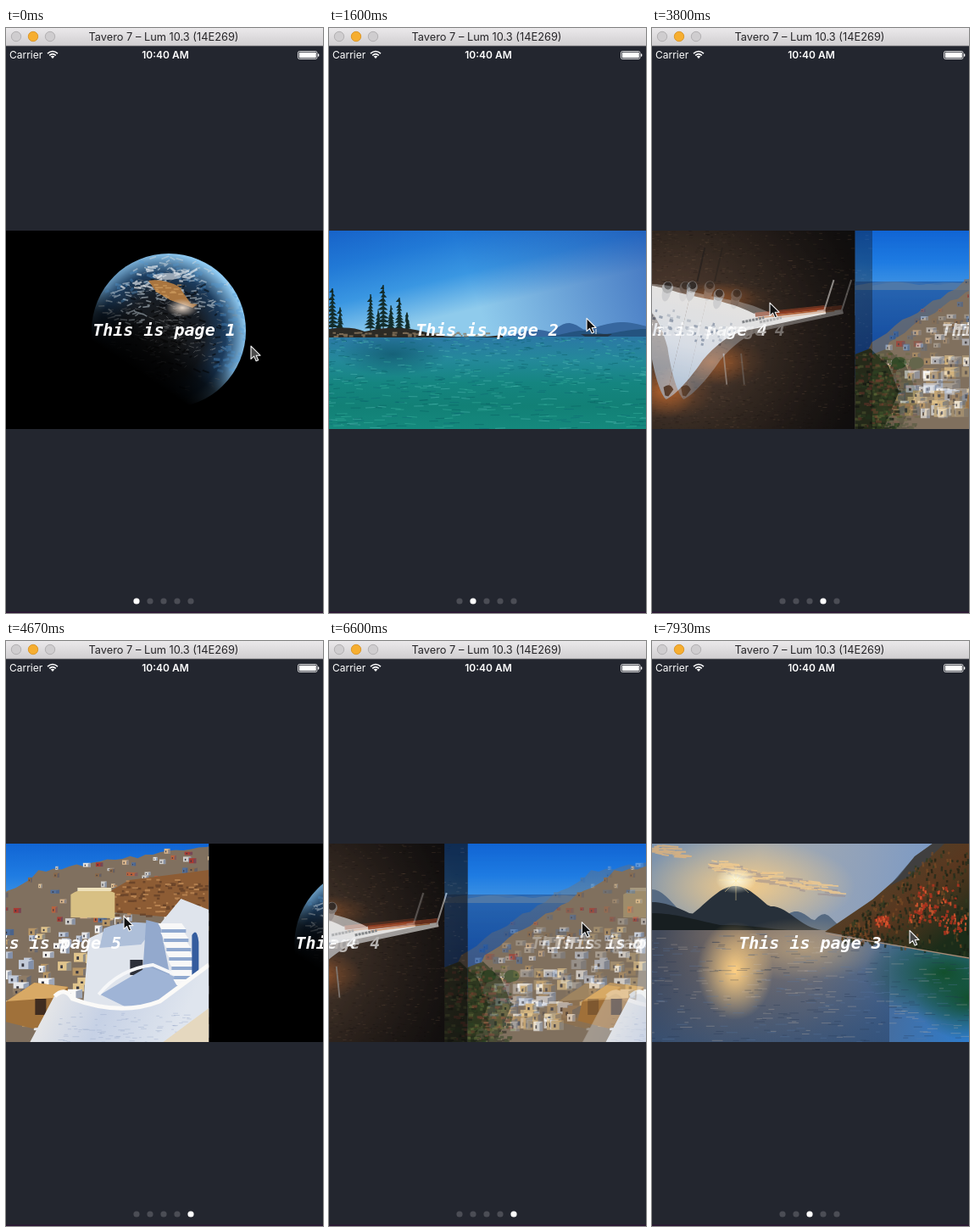
Animation of 374 by 690 pixels, one loop 8000 ms. Source, as an HTML page:

```html
<!DOCTYPE html>
<html lang="en">
<head>
<meta charset="utf-8">
<title>Looping pager</title>
<style>
  html, body { margin: 0; width: 100%; height: 100%; overflow: hidden; background: #23262f; }
  svg { display: block; }
  .ui { font-family: Inter, Roboto, sans-serif; }
  .label { font: italic bold 20px "DejaVu Sans Mono", monospace; fill: #fff; }
</style>
</head>
<body>
<svg id="stage" width="374" height="690" viewBox="0 0 374 690"></svg>
<script>
const W = 374, H = 234, TOP = 239, LOOP = 8000, STEP = 200 / 3;
const stage = document.getElementById('stage');

// --- drawing helpers ---
let seed = 7;
const rnd = (a = 0, b = 1) => {
  seed = (seed * 16807) % 2147483647;
  return a + (b - a) * seed / 2147483647;
};
const pick = list => list[Math.floor(rnd(0, list.length))];
const many = (n, make) => Array.from({ length: n }, (_, i) => make(i)).join('');
const px = v => v.toFixed(1);
const rect = (x, y, w, h, fill, extra = '') =>
  `<rect x="${px(x)}" y="${px(y)}" width="${px(w)}" height="${px(h)}" fill="${fill}" ${extra}/>`;
const oval = (x, y, rx, ry, fill, extra = '') =>
  `<ellipse cx="${px(x)}" cy="${px(y)}" rx="${px(rx)}" ry="${px(ry)}" fill="${fill}" ${extra}/>`;
const path = (d, fill, extra = '') => `<path d="${d}" fill="${fill}" ${extra}/>`;
const line = (d, color, width, extra = '') =>
  path(d, 'none', `stroke="${color}" stroke-width="${width}" ${extra}`);
const stops = colors => colors.map((c, i) => `<stop offset="${i / (colors.length - 1)}" stop-color="${c}"/>`).join('');
const linear = (id, x1, y1, x2, y2, ...colors) =>
  `<linearGradient id="${id}" gradientUnits="userSpaceOnUse" x1="${x1}" y1="${y1}" x2="${x2}" y2="${y2}">${stops(colors)}</linearGradient>`;
const radial = (id, cx, cy, r, ...colors) =>
  `<radialGradient id="${id}" gradientUnits="userSpaceOnUse" cx="${cx}" cy="${cy}" r="${r}">${stops(colors)}</radialGradient>`;
const glow = (id, color) => `<radialGradient id="${id}">${stops([color, color + '00'])}</radialGradient>`;

// Scattered short strokes; place() gives x, y, dx, dy.
const dashes = (n, color, width, alpha, place) => line(many(n, () => {
  const [x, y, dx, dy = 0] = place();
  return `M${px(x)} ${px(y)}l${px(dx)} ${px(dy)}`;
}), color, width, `opacity="${alpha}"`);
const within = (x0, x1, y0, y1, len) => () => [rnd(x0, x1), rnd(y0, y1), rnd(len * .3, len)];

// A mountain outline made of bell-shaped peaks: centre, height, width.
const mountains = (base, fill, ...peaks) => {
  let d = `M0 ${base}`;
  for (let x = 0; x <= W + 4; x += 4) {
    const height = Math.max(...peaks.map(([c, h, w]) => h * Math.exp(-(((x - c) / w) ** 2))));
    d += `L${x} ${px(base - height)}`;
  }
  return path(`${d}V${base}z`, fill);
};

// --- the five pictures ---
function earth() {
  const around = (from, to, near, far, len) => () => {
    const a = rnd(from, to), d = rnd(near, far);
    return [192 + Math.cos(a) * d, 118 + Math.sin(a) * d, rnd(len * .3, len), rnd(-len, len) * .4];
  };
  return radial('globe', 184, 126, 100, '#1a1b1d', '#17191c', '#171d25', '#1c3c5e', '#8fcaf2')
    + linear('night', 147, 160, 182, 108, '#000', '#000b', '#0000')
    + glow('landGlow', '#e9d8c8')
    + '<clipPath id="disc"><circle cx="192" cy="118" r="91"/></clipPath>'
    + rect(0, 0, W, H, '#000')
    + `<g clip-path="url(#disc)">${rect(90, 20, 200, 200, 'url(#globe)')}`
    + dashes(90, '#4f96d2', 3, .35, around(-2.6, .7, 62, 90, 9))
    + dashes(260, '#8d8f92', 1, .42, around(0, 6.3, 5, 85, 7))
    + dashes(120, '#000', 2, .5, around(0, 6.3, 0, 70, 8))
    + dashes(120, '#c9d5df', 1.6, .55, around(-3, -.5, 35, 88, 9))
    + dashes(30, '#fff', 2.4, .6, around(-2.4, -1.2, 50, 80, 11))
    + path('M168 59 Q185 56 204 66 L218 86 226 87 220 91 194 82 177 72z', '#a9753f')
    + dashes(16, '#d2a062', 1.5, .7, within(174, 205, 63, 79, 8))
    + oval(190, 54, 17, 4, '#fff', 'opacity=".55"') + oval(208, 91, 19, 11, 'url(#landGlow)')
    + '</g>' + rect(90, 20, 200, 200, 'url(#night)');
}

function lake() {
  const pine = (x, height) => line(`M${x} 118v${-height}`, '#152723', 1.2) + many(10, i => {
    const y = 118 - height * (1 - i / 11), reach = (i + 1.5) * height / 75;
    return path(`M${x} ${px(y)}l${px(reach + rnd(0, 2))} 5h${px(-2 * reach - rnd(0, 4))}z`, '#142d2b');
  });
  return linear('sky2', 0, 0, 30, 126, '#1763c9', '#2179d6', '#3a97e2', '#8fcbec')
    + linear('dusk2', 170, 70, 374, 0, '#123fa500', '#123fa599')
    + linear('water2', 0, 125, 0, H, '#2b78a5', '#24899a', '#158580', '#128076', '#15897d')
    + glow('shade2', '#0b4a60')
    + rect(0, 0, W, 126, 'url(#sky2)') + rect(0, 0, W, 126, 'url(#dusk2)')
    + mountains(126, '#37679f', [245, 9, 28], [283, 17, 22], [346, 18, 50])
    + mountains(126, '#24537f', [300, 8, 30], [374, 10, 50])
    + rect(0, 125, W, 110, 'url(#water2)')
    + oval(75, 146, 65, 26, 'url(#shade2)', 'opacity=".6"')
    + many(4, i => dashes(150, ['#075a5e', '#3fb9a4', '#0c6374', '#5cc2bd'][i], 1, .42, () => {
      const depth = rnd() ** 1.4;
      return [rnd(-10, W), 127 + depth * 107, rnd(3, 6) + depth * 8, rnd(-1, 1)];
    }))
    + [[4, 50], [49, 43], [64, 54], [83, 39]].map(([x, h]) => pine(x, h) + pine(x + 9, h * .55)).join('')
    + path('M0 116 Q25 112 42 119 Q80 110 115 120 T205 123 V126 H0z', '#2c2a25')
    + dashes(45, '#8b7860', 2, .8, within(0, 195, 120, 125, 6))
    + path('M297 122H334l-5 3H302z', '#243749') + line('M315 122v-6', '#dce9f1', 1);
}

function sunset() {
  const slope = () => {
    const x = rnd(225, W), top = Math.max(3, 92 - (x - 230) * .9);
    return [x, rnd(top + 5, 114 + (x - 222) * .1), rnd(-1, 1), rnd(2, 6)];
  };
  const grove = (cx, cy, r) => () => [cx + rnd(-r, r), cy + rnd(-r, r) * .7, rnd(-1, 1), rnd(2, 5)];
  const streaks = (x, y, w, tilt) => () => {
    const k = rnd();
    return [x + k * w, y + k * tilt + rnd(-6, 6), rnd(5, 20), rnd(0, 2)];
  };
  return linear('sky3', 0, 0, W, 60, '#7c93ad', '#a7abad', '#8fa1bb', '#6f95cb')
    + linear('water3', 0, 130, W, 220, '#41495a', '#857468', '#7e7a7d', '#456d9f', '#2f7ccb')
    + linear('deep3', 0, 110, 0, H, '#30416300', '#304d74cc')
    + linear('hill3', 250, 30, 330, 130, '#4f432b', '#59371f', '#1b2c19')
    + glow('gold', '#ffd083') + glow('sunCore', '#fffde2') + glow('green3', '#124f2c')
    + rect(0, 0, W, 104, 'url(#sky3)') + oval(110, 50, 130, 55, 'url(#gold)', 'opacity=".85"')
    + dashes(22, '#e2b57c', 2, .8, streaks(-10, 4, 40, 6))
    + dashes(60, '#9a8a8c', 2, .5, streaks(65, 26, 150, 32))
    + dashes(60, '#f3cb8e', 1.6, .8, streaks(65, 24, 150, 32))
    + mountains(102, '#566a82', [0, 48, 38], [170, 22, 25], [203, 19, 16])
    + mountains(104, '#27303a', [0, 35, 65], [98, 54, 52], [142, 30, 35])
    + mountains(104, '#171e20', [0, 22, 80], [90, 8, 60])
    + oval(99, 43, 24, 16, 'url(#sunCore)')
    + line('M99 26v41M79 43h40M85 31l29 27M112 31l-26 26', '#ffe6a0', .8, 'opacity=".6"')
    + rect(0, 102, W, 134, 'url(#water3)') + rect(0, 102, 280, 134, 'url(#deep3)')
    + oval(98, 150, 45, 58, 'url(#gold)') + oval(180, 125, 95, 38, 'url(#gold)', 'opacity=".4"')
    + oval(345, 152, 95, 58, 'url(#green3)') + oval(374, 182, 65, 50, 'url(#green3)')
    + many(3, i => dashes(150, ['#22334f', '#c0b4a8', '#587aa5'][i], 1, .32, within(-10, W, 106, H, 15)))
    + path('M204 104 L260 66 290 40 310 15 331 0H374V136L270 116z', 'url(#hill3)')
    + path('M280 50 L310 15 331 0h14L305 38z', '#38404a', 'opacity=".7"')
    + many(4, i => dashes(110, ['#1c2a1b', '#2f3b20', '#7b4a24', '#1a2013'][i], 2.4, .7, slope))
    + [[272, 90, 8], [320, 80, 16], [355, 92, 16], [338, 62, 24]].map(spot =>
      dashes(22, '#b8341f', 3, .8, grove(...spot)) + dashes(14, '#df5a30', 2, .8, grove(...spot))).join('')
    + line('M205 106 Q265 116 374 135', '#a58c78', 1.4);
}

function aircraft() {
  const half = path('M0 4 C10 -2 24 -30 32 -51 C42 -70 55 -88 73 -96 L161 -137 157 -146 78 -118 C60 -122 46 -124 15 -122 H0z', 'url(#hull)')
    + line('M80 -117L158 -144', '#8d3c22', 5) + line('M84 -114L150 -138', '#c7733d', 1.5)
    + line('M158 -139l3 -39', '#c9c5c1', 2) + line('M54 -64l12 35', '#a19a95', 1.8)
    + dashes(11, '#5b6b85', 3, .8, within(8, 38, -100, -62, 5))
    + line('M67 -105l24 -11', '#4f5358', 3, 'stroke-dasharray="3 1"');
  const engine = (x, y) => oval(x, y + 6, 5, 11, '#c4c4c6') + oval(x, y, 6.5, 7, '#98989a') + oval(x, y - 2, 4.5, 4.5, '#2a2828');
  return radial('ground', 150, 125, 235, '#604431', '#4a382d', '#332821', '#1f1916', '#100e0e')
    + linear('hull', 0, -130, 0, 5, '#e6e3df', '#d8dde5', '#a9bdd3')
    + glow('fire', '#d8712c')
    + rect(0, 0, W, H, 'url(#ground)')
    + many(3, i => dashes(500, ['#0c0908', '#80624b', '#1a1411'][i], 1, .33, within(0, W, 0, H, 5)))
    + oval(205, 155, 45, 28, 'url(#fire)', 'opacity=".6"') + oval(145, 190, 42, 32, 'url(#fire)', 'opacity=".8"')
    + oval(205, 80, 55, 20, 'url(#fire)', 'opacity=".5"')
    + line('M197 20l-9 40', '#221e1c', 2)
    + `<g transform="translate(152 195) rotate(13.1)">${half}<g transform="scale(-1 1)">${half}</g>`
    + engine(-28, -125) + engine(0, -132) + engine(33, -130)
    + path('M-6 -9 Q0 -17 6 -9 L2 0H-2z', '#3b3431') + '</g>';
}

function village() {
  const ridge = x => Math.max(2, 120 - (x - 35) * .63, 32 - (x - 174) * .15);
  const house = (x, y, w, h, color) => rect(x, y, w, h, color)
    + path(`M${px(x + w)} ${px(y)}v${px(h)}h${px(-w * .35)}v${px(-h * .8)}z`, '#42577c', 'opacity=".5"')
    + rect(x + w * .2, y + h * .4, w * .16, h * .35, '#37363f');
  const upper = ['#e8e4df', '#cfcdca', '#d9b68d', '#b9623e', '#a83a32', '#e3c79c', '#54709a', '#8a6a4c'];
  const lower = ['#f3f1ee', '#e6e7ea', '#c3cbd9', '#e0c48c', '#b79666', '#fbfaf8', '#8f7c66'];
  const hillside = many(230, i => {
    const k = i / 230, x = rnd(28, W), size = 6 + k * 10;
    return house(x, ridge(x) - 4 + k * (218 - ridge(x)), rnd(size * .6, size * 1.6), rnd(size * .5, size), pick(k < .35 ? upper : lower));
  });
  return linear('sky5', 0, 0, 0, 75, '#1165d4', '#1f7ce2', '#4a9be4')
    + linear('sea5', 0, 55, 0, 150, '#2a69b4', '#12489c')
    + linear('wall5', 170, 160, 330, H, '#f1eee9', '#c6d1e5', '#dfe5ee')
    + rect(0, 0, W, 100, 'url(#sky5)') + rect(0, 60, 180, 120, 'url(#sea5)')
    + mountains(70, '#4f78a8', [40, 10, 50], [110, 9, 50])
    + path(`M0 175${many(42, i => `L${20 + i * 9} ${px(ridge(20 + i * 9) + rnd(-2, 3))}`)}V${H}H0z`, '#80705f')
    + hillside
    + path('M256 57L280 43 374 31V91L263 81z', '#8d5c34')
    + dashes(70, '#5e3c26', 2.5, .7, within(258, 372, 45, 86, 8)) + dashes(50, '#c08a55', 2, .8, within(260, 372, 42, 84, 7))
    + path('M211 87V60Q232 46 263 58V88z', '#d8c084') + rect(219, 52, 40, 4, '#eee1bb')
    + path(`M0 146L18 139 40 160 52 190 34 ${H}H0z`, '#2f3820')
    + many(4, i => dashes(50, ['#171f14', '#5e6838', '#74402f', '#2c4423'][i], 3, .8, within(-2, 50, 145, H, 7)))
    + oval(52, 156, 9, 7, '#36532b')
    + path('M135 186L168 164 208 169 202 211 166 218 130 209z', '#a0713a') + path('M135 186L168 164 208 169 190 182z', '#d8a965')
    + rect(169, 183, 13, 19, '#3f2c20')
    + path('M232 112Q270 92 317 94L341 65 374 78V200H225z', '#dfe4ec')
    + path('M250 100Q280 88 312 96L294 119 245 123z', '#aebfd9')
    + path('M300 90L316 94 330 165 296 150z', '#93a9cd')
    + rect(281, 137, 15, 18, '#2d3039') + path('M246 178L302 145 355 165 291 200z', '#9fb4d6')
    + line('M244 178Q268 148 308 143L352 162', '#f6f7f9', 4)
    + many(7, i => path(`M${314 + i * 3} ${94 + i * 11}h28l5 7h-29z`, '#f8f8f8') + rect(318 + i * 3, 101 + i * 11, 29, 4, '#8fa8cf'))
    + path('M354 108Q360 98 362 116V158H354z', '#345c9e')
    + path(`M163 ${H}L192 179Q204 167 213 181Q270 202 316 184L374 141V${H}z`, 'url(#wall5)')
    + dashes(90, '#90a2c2', 1, .35, within(195, 350, 200, H, 8))
    + line('M192 180Q204 168 213 183Q270 204 316 186L374 143', '#fbfaf8', 5)
    + path(`M320 ${H}L374 194V${H}z`, '#e5d8bf');
}

const pages = [earth, lake, sunset, aircraft, village].map((draw, i) =>
  `<symbol id="page${i}" viewBox="0 0 ${W} ${H}">${draw()}<text class="label" x="186.5" y="124" text-anchor="middle">This is page ${i + 1}</text></symbol>`).join('');
const strip = many(6, i => `<use href="#page${i % 5}" x="${i * W}" width="${W}" height="${H}"/>`);
const light = (i, fill, edge) => oval(12 + i * 20, 10, 5.7, 5.7, fill, `stroke="${edge}"`);

stage.innerHTML = `<defs>${pages}${linear('bar', 0, 0, 0, 21, '#ebe9eb', '#d0ced0')}</defs>`
  + rect(0, 0, W, 690, '#23262f')
  + rect(0, 0, W, 21, 'url(#bar)') + rect(0, 20.5, W, .8, '#a9a7a9')
  + light(0, '#cfcdcf', '#b3b1b3') + light(1, '#f6ae30', '#dc982a') + light(2, '#cfcdcf', '#b3b1b3')
  + `<g class="ui"><text x="186" y="15" font-size="12.8" fill="#262528" text-anchor="middle">Tavero 7 – Lum 10.3 (14E269)</text>
     <text x="4" y="36" font-size="12" fill="#fff">Carrier</text>
     <text x="188" y="36" font-size="12" font-weight="600" fill="#fff" text-anchor="middle">10:40 AM</text></g>`
  + line('M49 30.2Q55 24.8 61 30.2M51.2 32.3Q55 28.8 58.8 32.3', '#fff', 1.6) + path('M52.7 33.6Q55 31.8 57.3 33.6L55 36z', '#fff')
  + rect(344.5, 27.5, 22.5, 9, 'none', 'rx="1.8" stroke="#fff" stroke-width=".8"')
  + rect(345.8, 28.8, 20, 6.4, '#fff', 'rx=".8"') + rect(368, 30.3, 1.3, 3.4, '#fff', 'rx=".6"')
  + `<svg y="${TOP}" width="${W}" height="${H}"><g id="strip">${strip}</g><g id="trail" opacity=".35">${strip}</g></svg>`
  + many(5, i => oval(154 + i * 16, 676, 3.6, 3.6, '#4b4d55', 'class="dot"'))
  + rect(0, 688.6, W, 1.4, '#2b1434')
  + path('M0 0V15.3L3.6 12 6.1 17.7 8.7 16.6 6.2 11.1H11z', '#111', 'id="cursor" stroke="#f2f2f2" stroke-width="1.1" stroke-linejoin="round"');

// --- motion, counted in steps of 1/15 s ---
const SPAN = 12, DRAG = 2.25, LAG = .38, LEFT = 145, RIGHT = 310;
const clamp = v => Math.min(1, Math.max(0, v));
const smooth = k => k * k * (3 - 2 * k);

// Five swipes forward, then three back; each holds briefly before it pulls.
const swipes = [[9, .75], [22, 2], [36, 2], [54, .75], [67, .75], [80, 2], [93, 4], [106, 4]]
  .map(([start, hold], i) => ({ start, grab: start + hold, dir: i < 5 ? 1 : -1 }));

const position = n => swipes.reduce((sum, { start, grab, dir }) => {
  const left = 1 - clamp((n - grab) / (start + SPAN - grab));
  return sum + dir * (1 - left * left);
}, 0);

// The pointer drags with each swipe and goes back when the next one has the same direction.
const moves = [{ at: 1, span: 5, by: 15 }];
swipes.forEach(({ grab, dir }, i) => {
  const by = dir * (LEFT - RIGHT);
  moves.push({ at: grab, span: DRAG, by });
  if (swipes[i + 1]?.dir === dir) moves.push({ at: grab + DRAG + 4, span: 7, by: -by });
});
const cursorX = n => moves.reduce((x, m) => x + m.by * smooth(clamp((n - m.at) / m.span)), 289);
const cursorY = n => 324 + (n < 60 ? .0142 : .005) * (n - 60) ** 2;

const [stripNode, trailNode, cursorNode] = ['strip', 'trail', 'cursor'].map(id => document.getElementById(id));
const dots = [...stage.querySelectorAll('.dot')];

function render(ms) {
  const n = Math.floor((ms % LOOP) / STEP + .06);
  const swiping = swipes.some(({ start }) => n >= start && n < start + SPAN);
  const pos = position(n), last = position(n - LAG);
  const blurred = last !== pos && pos < 4; // the wrap-around page leaves no trail
  stripNode.setAttribute('transform', `translate(${-pos * W} 0)`);
  trailNode.setAttribute('transform', `translate(${-last * W} 0)`);
  trailNode.setAttribute('display', blurred ? 'inline' : 'none');
  const active = Math.round(pos) % 5;
  dots.forEach((dot, i) => dot.setAttribute('fill', i === active ? '#fff' : '#4b4d55'));
  cursorNode.setAttribute('transform', `translate(${cursorX(n)} ${cursorY(n)})`);
  cursorNode.setAttribute('fill', swiping ? '#111' : '#4a4a4a');
}

function tick() {
  render(performance.now());
  requestAnimationFrame(tick);
}
tick();
</script>
</body>
</html>
```
